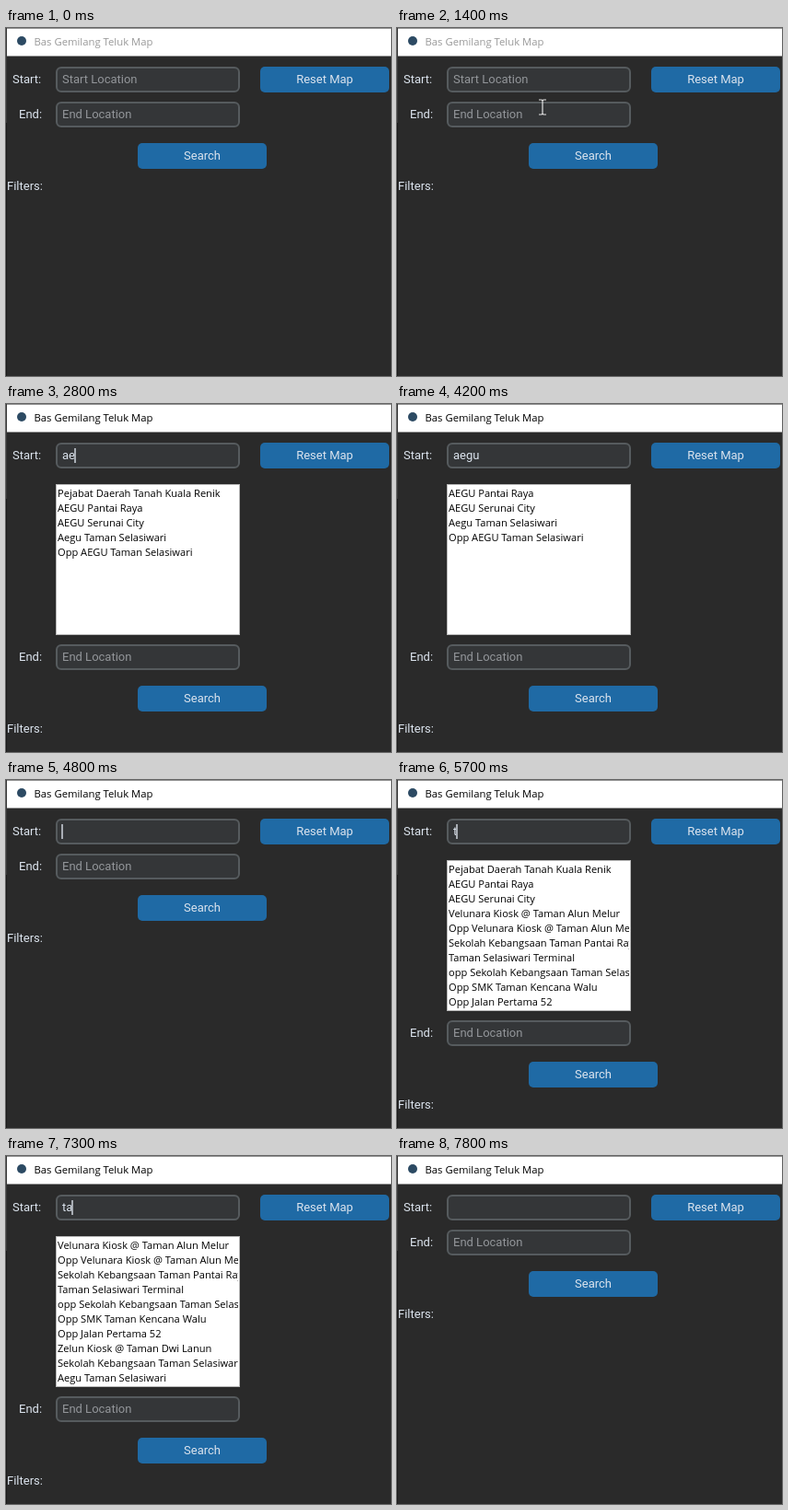
Recreate the animation shown at these times as an HTML page. Size 418 by 378 pixels, loop 8 s.

```html
<!DOCTYPE html>
<html lang="ms">
<head>
<meta charset="utf-8">
<title>Bas Gemilang Teluk Map</title>
<style>
  html, body { margin: 0; width: 100%; height: 100%; overflow: hidden; background: #2a2a2a; }
  #stage { position: relative; width: 418px; height: 378px; overflow: hidden; background: #2a2a2a;
    font: 13px Roboto, sans-serif; color: #dce4ee; }
  #stage div { position: absolute; box-sizing: border-box; white-space: pre; }
  #edge { left: 0; top: 0; width: 1px; height: 378px;
    background: linear-gradient(#383838 103px, #1a1a1a 103px); }
  #bar { left: 1px; top: 0; width: 417px; height: 31px; background: #fff;
    border: solid #959595; border-width: 1px 0; }
  #icon { left: 11px; top: 8px; width: 10px; height: 10px; border-radius: 50%; background: #2c4a63; }
  #title { left: 29.5px; top: -1px; font: 11.3px/30px "Open Sans", sans-serif; }
  .label { height: 28px; line-height: 28px; }
  .entry { left: 54px; width: 200px; height: 28px; padding-left: 5px; line-height: 24px;
    background: #343638; border: 2px solid #565b5e; border-radius: 6px; }
  .hint { color: #93969a; }
  .button { width: 140px; height: 28px; line-height: 28px; text-align: center;
    background: #1f6aa5; border-radius: 5px; }
  #caret { display: inline-block; width: 2px; height: 16px; margin: 0 -1px;
    vertical-align: -4px; background: #a8adb4; }
  #lower { left: 0; top: 80px; width: 418px; height: 110px; }
  #list { left: 54px; top: 87px; width: 200px; height: 164px; overflow: hidden;
    background: #fff; color: #000; border: 2px solid #fff;
    outline: 1px solid #b8b8b8; outline-offset: -1px;
    font: 11.1px/16px "Open Sans", sans-serif; }
  svg { position: absolute; left: 0; top: 0; overflow: visible; }
</style>
</head>
<body>
<div id="stage">
  <div id="edge"></div>
  <div id="bar"><div id="icon"></div><div id="title">Bas Gemilang Teluk Map</div></div>
  <div class="label" style="left:7px;top:42px">Start:</div>
  <div class="entry" style="top:42px"><span id="typed"></span><span id="caret"></span></div>
  <div class="button" style="left:276px;top:42px">Reset Map</div>
  <div id="list"></div>
  <div id="lower">
    <div class="label" style="left:14px;top:0">End:</div>
    <div class="entry hint" style="top:0">End Location</div>
    <div class="button" style="left:143px;top:45px">Search</div>
    <div class="label" style="left:1px;top:78px">Filters:</div>
  </div>
  <svg width="1" height="1">
    <g id="pointer">
      <path id="arrow" d="M0 0V15L3.6 11.7L6 17L8.2 16L5.9 10.9H10.6Z" fill="#fff" stroke="#000" stroke-width=".8"/>
      <path id="beam" d="M-4 -8H-1L0 -7L1 -8H4M0 -7V7M-4 8H-1L0 7L1 8H4" fill="none" stroke="#e4e4e4" stroke-width="1.2"/>
    </g>
  </svg>
</div>
<script>
const LOOP = 8000, TICK = 100, FOCUS = 1700, SHIFT = 181;

const stops = [
  "Pejabat Daerah Tanah Kuala Renik",
  "AEGU Pantai Raya",
  "AEGU Serunai City",
  "Velunara Kiosk @ Taman Alun Melur",
  "Opp Velunara Kiosk @ Taman Alun Melur",
  "Sekolah Kebangsaan Taman Pantai Raya",
  "Taman Selasiwari Terminal",
  "opp Sekolah Kebangsaan Taman Selasiwari",
  "Opp SMK Taman Kencana Walu",
  "Opp Jalan Pertama 52",
  "Zelun Kiosk @ Taman Dwi Lanun",
  "Sekolah Kebangsaan Taman Selasiwari",
  "Aegu Taman Selasiwari",
  "Opp AEGU Taman Selasiwari"
];

// time, entry text, list query when it lags behind the text
const typing = [
  [0, ""], [2400, "a"], [2600, "ae"], [3000, "aeg"], [3200, "aegu"],
  [4400, "aeg"], [4500, "ae"], [4600, "a"], [4700, ""],
  [5600, "t"], [5800, "ta"], [5900, "tam"], [6000, "tama"], [6200, "taman"],
  [6900, "tama"], [7100, "tam"], [7300, "ta", "tama"], [7400, "ta"], [7500, "t"], [7600, ""]
];

// time, x, y
const path = [
  [100, 412, 285], [700, 205, 300], [1100, 150, 240], [1400, 158, 86],
  [1700, 140, 57], [1900, 150, 60], [2100, 425, 170]
];

const $ = id => document.getElementById(id);
const show = (el, on) => { el.style.visibility = on ? "visible" : "hidden"; };
const matches = q => stops.filter(s => s.toLowerCase().includes(q)).slice(0, 10).join("\n");

function pointerAt(t) {
  const i = path.findIndex(p => p[0] > t);
  if (i < 1) return null;
  const [t0, x0, y0] = path[i - 1], [t1, x1, y1] = path[i];
  const k = (t - t0) / (t1 - t0);
  return [x0 + (x1 - x0) * k, y0 + (y1 - y0) * k];
}

const overEntry = (x, y) => x > 54 && x < 254 && ((y > 42 && y < 70) || (y > 80 && y < 108));

function draw(t) {
  const focused = t >= FOCUS;
  const [, text, query = text] = typing.filter(s => s[0] <= t).pop();

  $("title").style.color = focused ? "#000" : "#999";
  $("typed").textContent = focused ? text : "Start Location";
  $("typed").className = focused ? "" : "hint";
  show($("caret"), focused && (t - FOCUS) % 900 < 600);

  show($("list"), text);
  $("list").textContent = text ? matches(query) : "";
  $("lower").style.top = 80 + (text ? SHIFT : 0) + "px";

  const pos = pointerAt(t);
  const beam = pos && overEntry(...pos);
  show($("beam"), beam);
  show($("arrow"), pos && !beam);
  if (pos) $("pointer").setAttribute("transform", `translate(${pos})`);
}

const start = performance.now();
function frame() {
  const t = (performance.now() - start) % LOOP;
  draw(Math.floor(t / TICK) * TICK);
  requestAnimationFrame(frame);
}
frame();
</script>
</body>
</html>
```
